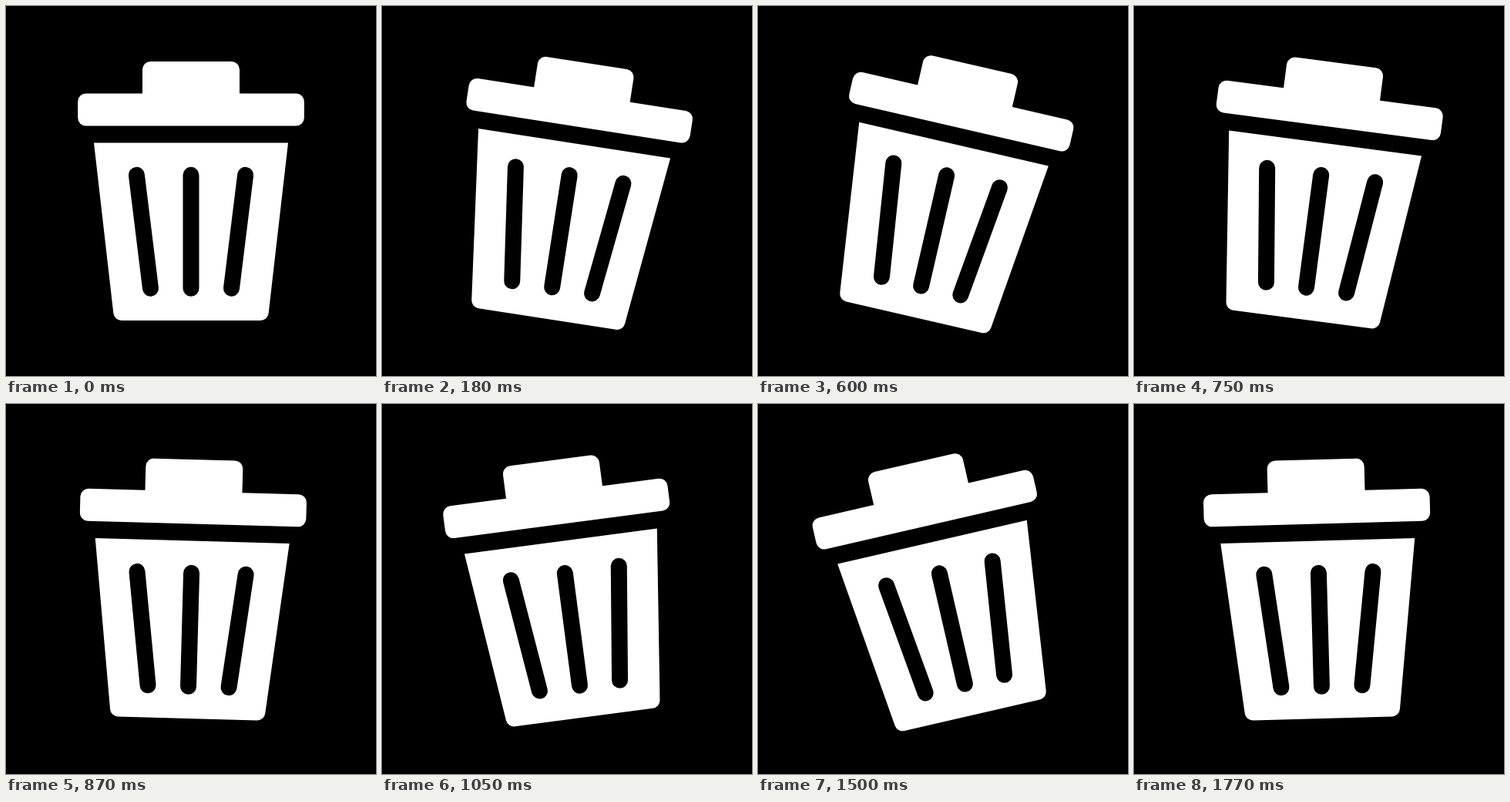
Recreate the animation shown at these times as an HTML page. Size 480 by 480 pixels, loop 1800 ms.

```html
<!DOCTYPE html>
<html lang="en">
<head>
<meta charset="utf-8">
<title>Swinging bin</title>
<style>
  html, body { margin: 0; width: 100%; height: 100%; overflow: hidden; background: #000; }
  svg { display: block; width: 100%; height: 100%; }
</style>
</head>
<body>
<svg viewBox="0 0 480 480">
  <g id="bin" fill="#fff">
    <path d="M177 120V82.5A10.5 10.5 0 0 1 187.5 72H292.5A10.5 10.5 0 0 1 303 82.5V120Z"/>
    <rect x="93.2" y="113.5" width="293.6" height="42" rx="10.5"/>
    <path d="M114 177.5H366L340.6 398.7A10.5 10.5 0 0 1 330.2 408H149.8A10.5 10.5 0 0 1 139.4 398.7Z"/>
    <path d="M169.4 219.3L187.5 366.3M240 219.3V366.3M310.6 219.3L292.5 366.3"
          stroke="#000" stroke-width="21" stroke-linecap="round"/>
  </g>
</svg>
<script>
  const LOOP = 1800, STEP = 30, SWING = 15;
  const bin = document.getElementById('bin');
  const start = performance.now();

  function draw(now) {
    const elapsed = Math.max(0, now - start) % LOOP;
    const time = Math.floor(elapsed / STEP) * STEP;
    const angle = SWING * Math.sin(2 * Math.PI * time / LOOP);
    bin.setAttribute('transform', `rotate(${angle} 240 240)`);
    requestAnimationFrame(draw);
  }
  draw(start);
</script>
</body>
</html>
```
